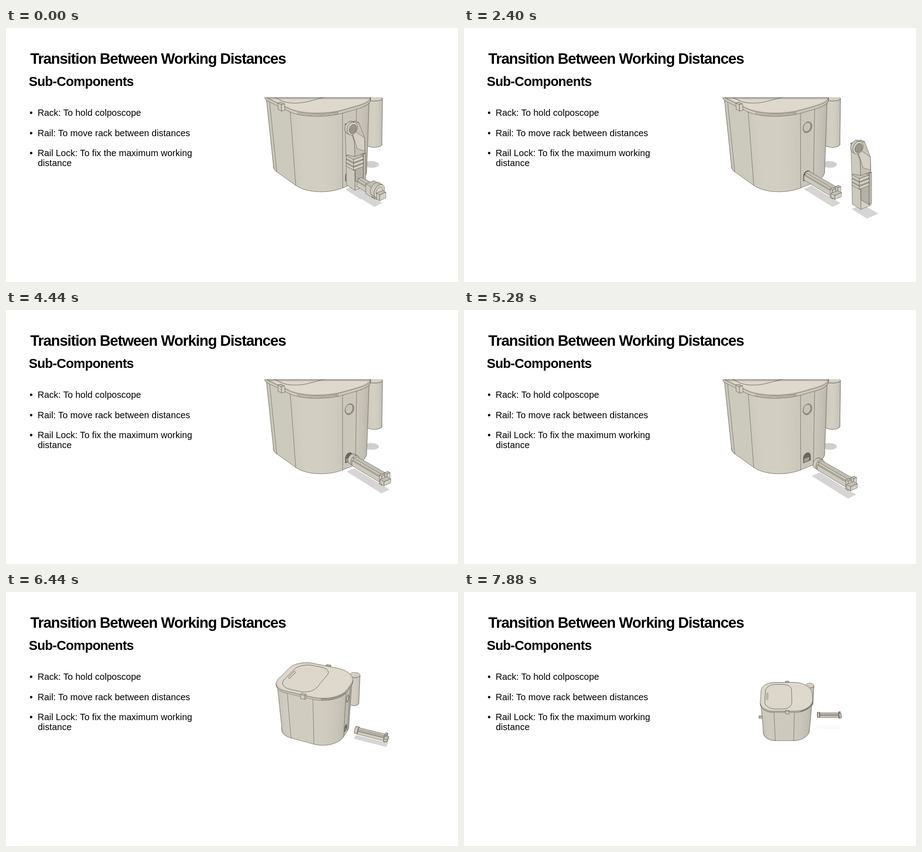
Write an HTML page with a canvas that moves like this. It is 997x561 px and loops after 8000 ms.

```html
<!DOCTYPE html>
<html lang="en">
<head>
<meta charset="utf-8">
<title>Transition Between Working Distances</title>
<style>
html, body { margin: 0; width: 100%; height: 100%; overflow: hidden; background: #fff; }
svg, canvas { position: absolute; left: 0; top: 0; width: 997px; height: 561px; }
text { font: 20px "Liberation Sans", Arial, sans-serif; letter-spacing: .03px; fill: #000; }
.title { font-size: 33px; font-weight: bold; letter-spacing: -1.24px; }
.sub { font-size: 29px; font-weight: bold; letter-spacing: -.75px; }
</style>
</head>
<body>
<svg viewBox="0 0 997 561">
  <text class="title" x="53.5" y="78.5">Transition Between Working Distances</text>
  <text class="sub" x="50.3" y="128">Sub-Components</text>
  <text x="52" y="194">•</text><text x="69.7" y="194">Rack: To hold colposcope</text>
  <text x="52" y="238.5">•</text><text x="69.7" y="238.5">Rail: To move rack between distances</text>
  <text x="52" y="283">•</text><text x="69.7" y="283">Rail Lock: To fix the maximum working</text>
  <text x="70.2" y="304.5">distance</text>
</svg>
<canvas width="997" height="561"></canvas>
<script>
const ctx = document.querySelector('canvas').getContext('2d');
const LOOP = 8000, CROP = 153, FOCAL = 1000;
const FLOOR = -1.65, RAIL_Y = -1.42, WALL = 0.95;
const BEIGE = [211, 207, 195], TOP = [222, 217, 204], LINE = 'rgba(66,63,56,.85)';

// Vectors and easing
const clamp = x => Math.min(1, Math.max(0, x));
const span = (t, a, b) => clamp((t - a) / (b - a));
const mix = (a, b, k) => a + (b - a) * k;
const sub = (a, b) => a.map((v, i) => v - b[i]);
const dot = (a, b) => a.reduce((s, v, i) => s + v * b[i], 0);
const mean = pts => [0, 1, 2].map(c => pts.reduce((s, p) => s + p[c], 0) / pts.length);
const unit = a => { const l = Math.hypot(...a) || 1; return a.map(v => v / l); };
const cross = (a, b) => [a[1] * b[2] - a[2] * b[1], a[2] * b[0] - a[0] * b[2], a[0] * b[1] - a[1] * b[0]];

// Orbit camera that pulls back from the close view to the front view
const cam = {};
function aim(k) {
  const q = (1 - k) ** 1.4, rad = Math.PI / 180;
  const yaw = 55 * q * rad, pitch = mix(40, 18, q) * rad, roll = 2 * q * rad;
  Object.assign(cam, {
    sy: Math.sin(yaw), cy: Math.cos(yaw),
    sp: Math.sin(pitch), cp: Math.cos(pitch),
    sr: Math.sin(roll), cr: Math.cos(roll),
    dist: mix(9.2, 17.9, k),
    x: mix(689, 711.5, k) - 64 * k * (1 - k),
    y: mix(230.3, 148, q)
  });
}

function view([x, y, z]) {
  const side = x * cam.cy - z * cam.sy, near = x * cam.sy + z * cam.cy;
  return [side, y * cam.cp - near * cam.sp, near * cam.cp + y * cam.sp];
}

function project([x, y, d]) {
  const f = FOCAL / (cam.dist - d), X = x * f, Y = -y * f;
  return [cam.x + X * cam.cr + Y * cam.sr, cam.y - X * cam.sr + Y * cam.cr];
}

const faces = (n, p) => dot(n, sub([0, 0, cam.dist], p)) > 0;

// Drawing of points in view space
function trace(pts, closed) {
  ctx.beginPath();
  pts.forEach(p => ctx.lineTo(...project(p)));
  if (closed) ctx.closePath();
}

function stroke(pts, closed = false, color = LINE, width = 0.7) {
  trace(pts, closed);
  ctx.strokeStyle = color;
  ctx.lineWidth = width;
  ctx.stroke();
}

function fill(pts, color, outline = LINE) {
  trace(pts, true);
  ctx.fillStyle = color;
  ctx.fill();
  if (outline) stroke(pts, true, outline);
}

const rgb = (tone, k = 1) => `rgb(${tone.map(v => Math.round(v * k))})`;

// Shaded solid between two rings, with outlines, creases and optional seams
function solid(ringA, ringB, { tone = BEIGE, cap = tone, seam = () => false } = {}) {
  const a = ringA.map(view), b = ringB.map(view), n = a.length;
  const core = mean([...a, ...b]);
  const sides = a.map((p, i) => {
    const j = (i + 1) % n, quad = [p, a[j], b[j], b[i]], mid = mean(quad);
    let normal = unit(cross(sub(a[j], p), sub(b[i], p)));
    if (dot(normal, sub(mid, core)) < 0) normal = normal.map(v => -v);
    return { quad, normal, seen: faces(normal, mid) };
  });
  for (const { quad, normal, seen } of sides) {
    if (!seen) continue;
    const color = rgb(tone, 0.88 + 0.12 * normal[2] - 0.03 * normal[0]);
    fill(quad, color, color);
  }
  sides.forEach(({ quad, normal, seen }, i) => {
    const prev = sides[(i + n - 1) % n];
    const crease = dot(normal, prev.normal) < 0.8 || seam(i);
    if (seen !== prev.seen || (seen && crease)) stroke([quad[0], quad[3]]);
    if (seen) {
      stroke([quad[0], quad[1]]);
      stroke([quad[3], quad[2]]);
    }
  });
  for (const [ring, other] of [[a, b], [b, a]]) {
    const centre = mean(ring);
    if (faces(sub(centre, mean(other)), centre)) fill(ring, rgb(cap));
  }
}

// Rings
const STEPS = 16;
function rounded(x0, x1, z0, z1, left, right) {
  const corners = [
    [x1 - right, z1 - right, right], [x0 + left, z1 - left, left],
    [x0 + left, z0 + left, left], [x1 - right, z0 + right, right]
  ];
  return corners.flatMap(([x, z, r], c) => Array.from({ length: STEPS + 1 }, (_, i) => {
    const a = (c + i / STEPS) * Math.PI / 2;
    return [x + r * Math.cos(a), z + r * Math.sin(a)];
  }));
}
const level = (pts, y, scale = 1, dx = 0) => pts.map(([x, z]) => [x * scale + dx, y, z * scale]);
const circle = (r, n = 28) => Array.from({ length: n }, (_, i) =>
  [r * Math.cos(i * 2 * Math.PI / n), r * Math.sin(i * 2 * Math.PI / n)]);
const upright = (pts, x, y, z = 0) => pts.map(([a, b]) => [x, y + b, z + a]);
const rect = (z0, z1, y0, y1) => [[z0, y0], [z1, y0], [z1, y1], [z0, y1]];

const box = (x0, x1, y0, y1, z0, z1, look) =>
  solid(upright(rect(z0, z1, y0, y1), x0, 0), upright(rect(z0, z1, y0, y1), x1, 0), look);
const floor = (x0, x1, z0, z1, color = '#d6d5d4') =>
  fill(level([[x0, z0], [x1, z0], [x1, z1], [x0, z1]], FLOOR).map(view), color, null);
const wallX = y => 1 + 0.05 * y / -FLOOR;

const PLAN = rounded(-1, 1, -0.87, 0.87, 0.52, 0.7);
const COVER = rounded(-0.85, 0.2, -0.76, 0.76, 0.42, 0.36);
const isSeam = i => i % (STEPS + 1) === 0 || i % (STEPS + 1) === STEPS;

function housing() {
  fill(level(PLAN, FLOOR, 0.95, -0.04).map(view), '#dddcdb', null);
  fill(level(circle(0.16), FLOOR).map(([x, y, z]) => view([x + 0.55, y, z - 0.95])), '#d0cfce', null);

  const tube = circle(0.155).map(([x, z]) => [x + 0.95, z - 0.66]);
  solid(level(tube, 0.02), level(tube, -0.95));
  box(-1.12, -0.98, -1.08, -1, 0.05, 0.12);

  solid(level(PLAN, 0), level(PLAN, FLOOR, 0.95), { seam: isSeam });
  openings();

  const hinge = side => box(-0.04, 0.09, -0.1, 0.03, side * 0.86, side * 0.93);
  hinge(-1);
  solid(level(PLAN, 0, 1.025), level(PLAN, -0.06, 1.025), { cap: TOP });
  lidDetails();
  hinge(1);
}

function lidDetails() {
  const top = level(PLAN, 0, 1.025).map(view);
  stroke(level(PLAN, 0, 0.99).map(view), true, 'rgba(66,63,56,.25)');
  fill(level(COVER, 0).map(view), rgb(TOP, 0.99));
  stroke(level(COVER, 0, 0.985).map(view), true, 'rgba(66,63,56,.4)');

  const slot = [-0.16, 0.17].map(z => view([-0.76, 0, z]));
  const arc = Array.from({ length: 13 }, (_, i) => {
    const a = (10 + 5 * i) * Math.PI / 180;
    return view([0.3 + 0.73 * Math.cos(a), -0.03, 0.17 + 0.73 * Math.sin(a)]);
  });
  const scale = 9.2 / cam.dist;
  for (const [pts, w] of [[slot, 7], [arc, 3.2]]) {
    stroke(pts, false, '#5b5850', w * scale);
    stroke(pts, false, rgb(BEIGE), w * scale - 1.2);
  }

  const shade = ctx.createLinearGradient(0, CROP, 0, CROP + 5);
  shade.addColorStop(0, 'rgba(85,83,78,.6)');
  shade.addColorStop(1, 'rgba(85,83,78,0)');
  fill(top, shade, null);
}

function openings() {
  const x = wallX(-0.4), axis = sub(view([1, 0, 0]), view([0, 0, 0]));
  if (!faces(axis, view([x, -0.4, 0]))) return;
  fill(upright(circle(0.108), x, -0.4).map(view), rgb(BEIGE, 0.75));
  fill(upright(circle(0.092), x, -0.39, 0.012).map(view), rgb(BEIGE, 0.94));
  const arch = [[-0.09, -0.1], ...circle(0.09).slice(0, 15).reverse(), [0.09, -0.1]];
  fill(upright(arch, WALL, RAIL_Y).map(view), '#6b675e');
  fill(upright(rect(-0.06, 0.08, -0.1, -0.01), WALL, RAIL_Y).map(view), '#a29e92');
}

function rail(start, lift, from = WALL) {
  const y = RAIL_Y + lift, end = start + 0.88;
  const rod = (x0, x1, ring, dy = 0, look) => {
    x0 = Math.max(x0, from);
    if (x1 > x0) solid(upright(ring, x0, y + dy), upright(ring, x1, y + dy), look);
  };
  rod(start, start + 0.09, circle(0.105));
  rod(start + 0.09, end, rect(-0.075, 0.075, -0.085, 0.02));
  rod(start + 0.09, end, rect(-0.045, 0.045, 0.02, 0.07), 0, { cap: TOP });
  rod(end, end + 0.06, rect(-0.1, -0.03, -0.1, 0.08));
  rod(end, end + 0.06, rect(0.03, 0.1, -0.1, 0.08));
  rod(end, end + 0.1, rect(-0.08, 0.08, -0.1, -0.02));
}

function rack() {
  floor(1.05, 1.5, -0.12, 0.16);
  box(1.02, 1.28, -1.57, -1.16, -0.12, 0.12);
  box(1, 1.24, -1.57, -0.9, -0.18, -0.12, { tone: rgb.dark });
  for (let i = 0; i < 3; i++) box(1.02, 1.24, -1.16 + i * 0.08, -1.1 + i * 0.08, -0.12, 0.12);
  const profile = [[1, -0.3], [1.1, -0.3], [1.27, -0.56], [1.28, -0.86], [1.02, -0.92]];
  const hood = z => profile.map(([x, y]) => [x, y, z]);
  solid(hood(-0.13), hood(0.12), { tone: BEIGE.map(v => v * 0.97) });
  const chute = [[1.12, -0.36, 0.08], [1.27, -0.56, -0.13], [1.285, -0.82, -0.12], [1.285, -0.72, 0.06]];
  fill(chute.map(view), rgb(TOP, 0.96));
  solid(upright(circle(0.125), 1, -0.4), upright(circle(0.125), 1.07, -0.4));
  fill(upright(circle(0.09), 1.075, -0.41, -0.01).map(view), '#99958a');
}
rgb.dark = BEIGE.map(v => v * 0.88);

function lock(y) {
  box(1.56, 1.74, y - 0.1, y + 0.1, -0.1, 0.1);
  solid(upright(circle(0.13), 1.72, y + 0.03), upright(circle(0.13), 1.82, y + 0.03));
  stroke(upright(circle(0.08), 1.82, y + 0.03).map(view), true);
  box(1.8, 1.88, y - 0.12, y, -0.1, 0.05);
}

function draw(t) {
  aim(span(t, 5300, 7880));
  ctx.clearRect(0, 0, 997, 561);
  ctx.save();
  ctx.beginPath();
  ctx.rect(0, CROP, 997, 561);
  ctx.clip();
  ctx.lineJoin = ctx.lineCap = 'round';

  const start = mix(0.86, 1.26, span(t, 3700, 5280));
  const lift = 0.43 * span(t, 7000, 7880);
  const slide = span(t, 1815, 2620), fade = 1 - span(t, 2640, 3000);

  housing();
  ctx.globalAlpha = 1 - lift * 2;
  floor(Math.max(1.02, start), start + 0.98, -0.06, 0.14);
  ctx.globalAlpha = 1;
  rail(start, lift);
  if (fade > 0) {
    ctx.save();
    ctx.globalAlpha = fade;
    ctx.translate(145 * slide, 58 * slide);
    rack();
    ctx.restore();
    rail(start, lift, 1.28 + 2 * slide);
  }
  if (t < 1160) lock(RAIL_Y + 0.00171 * Math.max(0, t - 60));
  ctx.restore();
}

let begin;
function tick(now) {
  begin ??= now;
  draw((now - begin) % LOOP);
  requestAnimationFrame(tick);
}
draw(0);
requestAnimationFrame(tick);
</script>
</body>
</html>
```
